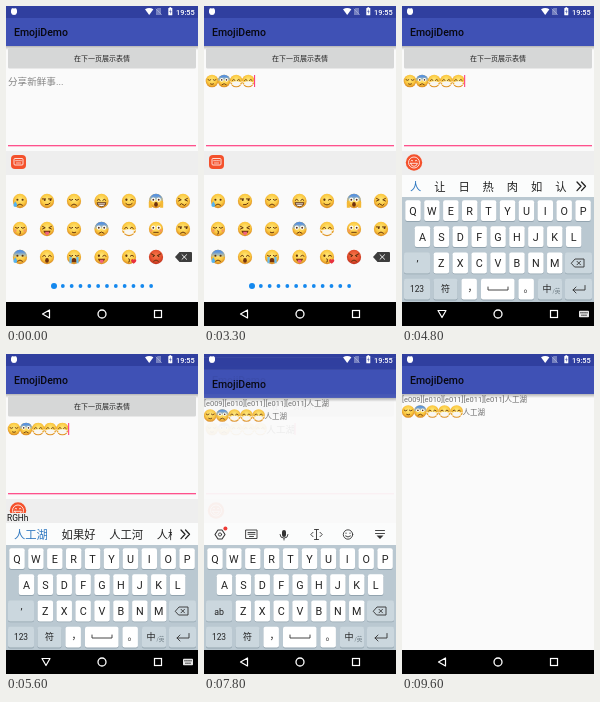
These frames come from a looping animation (192x320 px, 9.7 s). An HTML page:

```html
<!DOCTYPE html>
<html lang="zh-CN">
<head>
<meta charset="utf-8">
<title>Emoji input</title>
<style>
html, body { margin: 0; width: 100%; height: 100%; overflow: hidden; background: #fafafa; }
svg { display: block; width: 100%; height: 100%; }
text { font-family: Roboto, "Noto Sans CJK SC", "Noto Sans CJK", sans-serif; white-space: pre; }
.line { fill: none; stroke: #333; stroke-width: .9; stroke-linecap: round; stroke-linejoin: round; }
.ink { fill: none; stroke: #63340f; stroke-width: .95; stroke-linecap: round; stroke-linejoin: round; }
</style>
</head>
<body>
<svg id="stage" viewBox="0 0 192 320" preserveAspectRatio="none"></svg>
<script>
const LOOP = 9700, STEP = 100;
const rect = (x, y, w, h, fill, r = 0) => `<rect x="${x}" y="${y}" width="${w}" height="${h}" rx="${r}" fill="${fill}"/>`;
const disc = (x, y, r, fill) => `<circle cx="${x}" cy="${y}" r="${r}" fill="${fill}"/>`;
const fillPath = (d, fill) => `<path d="${d}" fill="${fill}"/>`;
const stroke = (d, cls = 'line', attrs = '') => `<path class="${cls}" d="${d}" ${attrs}/>`;
const label = (x, y, size, str, fill = '#222', attrs = '') =>
  `<text x="${x}" y="${y}" font-size="${size}" fill="${fill}" ${attrs}>${str}</text>`;
const centered = (x, y, size, str, fill) => label(x, y, size, str, fill, 'text-anchor="middle"');
const group = (id, body, attrs = '') => `<g id="${id}" ${attrs}>${body}</g>`;

// Facial parts, drawn around the origin on a face of radius 7
const eyes = {
  dots: disc(-2.5, -1.2, 1, '#5a2f10') + disc(2.5, -1.2, 1, '#5a2f10'),
  closed: stroke('M-4.4-1.4q1.7 1.7 3.2 0M1.2-1.4q1.5 1.7 3.2 0', 'ink'),
  happy: stroke('M-4.2-.7q1.5-2.2 3 0M1.2-.7q1.5-2.2 3 0', 'ink'),
  squint: stroke('M-4.3-2.5l2.6 1.3-2.6 1.2M4.3-2.5l-2.6 1.3 2.6 1.2', 'ink'),
  wide: [-2.6, 2.6].map(x => disc(x, -1.3, 2, '#fff') + disc(x, -1.2, .9, '#5a2f10')).join(''),
  side: stroke('M-4.5-2h3.2M1.3-2h3.2', 'ink') + disc(-2.2, -1, .9, '#5a2f10') + disc(3.4, -1, .9, '#5a2f10'),
  wink: disc(-2.5, -1.2, 1.1, '#5a2f10') + stroke('M1.2-.9q1.6-1.8 3.2 0', 'ink'),
  angry: stroke('M-4.5-3l3.3 1.6M4.5-3l-3.3 1.6', 'ink') + disc(-2.5, -.8, .8, '#5a2f10') + disc(2.5, -.8, .8, '#5a2f10')
};
const mouths = {
  frown: stroke('M-2.4 4q2.4-2.4 4.8 0', 'ink'),
  smile: stroke('M-3 2.5q3 2.8 6 0', 'ink'),
  calm: stroke('M-1.7 3.2q1.7 1.2 3.400 0', 'ink'),
  smirk: stroke('M-1.5 3.6q3 .5 4.5-1.5', 'ink'),
  flat: stroke('M-2.2 3.2h4.4', 'ink'),
  wave: stroke('M-3 3.5q1.5-2 3 0t3-.4', 'ink'),
  grin: '<path d="M-4.2 1.4h8.4q-.4 4-4.2 4t-4.2-4z" fill="#fff" stroke="#63340f" stroke-width=".8"/>' + stroke('M-3.8 3h7.6', 'ink', 'stroke-width=".5"'),
  open: '<ellipse cy="3.3" rx="1.8" ry="2.3" fill="#70320f"/>',
  wail: fillPath('M-2.6 5q0-4 2.6-4t2.6 4z', '#70320f'),
  kiss: stroke('M-.4 1.8q2 .5 .4 1.3 2 .6-.4 1.7', 'ink'),
  tongue: fillPath('M-3.5 1.8h7q-.7 3-3.5 3t-3.5-3z', '#70320f') + fillPath('M-1.7 2.7h3.6v2q-1.8 2.5-3.6 0z', '#f0647c'),
  mask: stroke('M-6.4 .8l2 1M6.4 .8l-2 1M-5.600 4.500l1.400-.6M5.600 4.500l-1.400-.6', 'ink', 'style="stroke:#fff;stroke-width:.8"') +
    fillPath('M-4.700 1.300Q0-.6 4.700 1.300L4.200 4Q0 7.400-4.200 4z', '#f8f6f2')
};
const extras = {
  blue: fillPath('M-6.9 0A6.9 6.9 0 0 1 6.9 0Q0-1.500-6.9 0z', 'url(#chill)'),
  drop: fillPath('M-4.5 .3q3.5 5-.1 5.6-3.5-.6 .1-5.6z', '#55b3ee'),
  tears: fillPath('M-4.4 0h2.1v6h-2.1zM2.3 0h2.1v6H2.3z', '#69bdf1'),
  blush: disc(-4.6, 1.6, 1.3, '#f69a5b') + disc(4.6, 1.6, 1.3, '#f69a5b'),
  heart: fillPath('M4.5 6.5Q.8 3.8 2.5 2.3 3.8 1.5 4.5 3q.9-1.5 2.2-.5Q8 4.3 4.5 6.5z', '#e8313f'),
  hands: fillPath('M-7 1q2-1.8 2.6 1l.5 4.5h-3zM7 1Q5 -.8 4.4 2l-.5 4.5h3z', '#f4b936')
};
const faces = [
  'dots frown drop', 'side smirk', 'closed frown', 'happy grin', 'wink smile', 'wide open blue hands', 'squint wave',
  'closed kiss blush', 'squint tongue', 'closed calm', 'wide frown blue', 'happy mask', 'wide flat blush', 'side frown',
  'dots frown blue drop', 'happy open', 'closed wail tears', 'wink tongue', 'wink kiss heart', 'angry frown red'
];
function faceSymbol(spec, i) {
  const [eye, mouth, ...more] = spec.split(' ');
  const skin = more.includes('red') ? 'redSkin' : 'skin';
  const under = more.includes('blue') ? extras.blue : '';
  const over = more.filter(m => m !== 'blue').map(m => extras[m] || '').join('');
  return group('face' + i, `<circle r="6.9" fill="url(#${skin})"/>` + under + eyes[eye] + mouths[mouth] + over);
}
const face = (i, x, y, size) => `<use href="#face${i}" transform="translate(${x} ${y}) scale(${size / 14})"/>`;

const gradient = (id, a, b, c) => `<radialGradient id="${id}" cy=".4" r=".62"><stop stop-color="${a}"/>
  <stop offset=".6" stop-color="${b}"/><stop offset="1" stop-color="${c}"/></radialGradient>`;
const defs = `<defs>${gradient('skin', '#ffe97c', '#fbc840', '#d5801c')}${gradient('redSkin', '#f77c4d', '#e6512f', '#b92d1b')}
  <linearGradient id="shade" x2="0" y2="1"><stop stop-opacity=".28"/><stop offset="1" stop-opacity="0"/></linearGradient>
  <linearGradient id="chill" x2="0" y2="1"><stop offset=".3" stop-color="#5b93dc"/><stop offset="1" stop-color="#9fc0d8" stop-opacity=".4"/></linearGradient>
  <clipPath id="aboveNav"><rect width="192" height="296"/></clipPath>
  <clipPath id="words"><rect y="169" width="166" height="23"/></clipPath>
  ${faces.map(faceSymbol).join('')}</defs>`;

const typed = [9, 10, 11, 11, 11];
const header = rect(0, 0, 192, 12, '#303f9f') + rect(0, 12, 192, 28, '#3f51b5') + rect(0, 40, 192, 4, 'url(#shade)') +
  label(8, 30.4, 10.5, 'EmojiDemo', '#080810', 'font-weight="500"');

const statusIcons = fillPath('M5 4.5q0-2.5 2-2.5l1 .8 1-.8q2 0 2 2.5v2Q10.5 9 8 9T5 6.5z', '#fff') +
  fillPath('M139 3.3q4.2-2.6 8.4 0L143.2 9z', '#fff') +
  fillPath('M151.5 2h3.500v7h-5V3.500z', '#7580c0') + stroke('M150 3l5.500 5.500', 'line', 'style="stroke:#b5bce0;stroke-width:.6"') +
  rect(162.3, 2, 4, 7.3, '#fff', .5) + rect(163.4, 1.2, 1.8, 1, '#fff') + fillPath('M164.600 3l-1.300 3h1v2.300l1.300-3h-1z', '#5562b0') +
  label(170, 8.5, 7.4, '19:55', '#fff', 'font-weight="500"');

const keyboardBadge = rect(5, 149, 15, 14, '#f4512c', 4) +
  '<rect x="8" y="152.5" width="9" height="6.5" rx="1" fill="none" stroke="#fff" stroke-width=".8"/>' +
  stroke('M9.6 154.7h5.8M10.5 157h4', 'line', 'style="stroke:#fff;stroke-width:.7;stroke-dasharray:1 .8"');
const smileBadge = disc(12, 156.5, 8.2, '#f4512c') +
  stroke('M9 154.8q.9-1.400 1.800 0M13.200 154.800q.9-1.400 1.800 0M8.600 157.300h6.800q-.6 3-3.400 3t-3.400-3z', 'line', 'style="stroke:#fff;stroke-width:.8"') +
  '<circle cx="12" cy="156.5" r="5.500" fill="none" stroke="#fff" stroke-width=".8"/>';

const columns = [14, 41, 68, 95.5, 123, 150, 177];
const emojiPanel = rect(0, 169, 192, 127, '#fafafa') +
  faces.map((_, i) => face(i, columns[i % 7], 195 + 28 * Math.floor(i / 7), 14.5)).join('') +
  fillPath('M169 251l4.5-5H185q1 0 1 1v8q0 1-1 1h-11.5z', '#3d3d3d') +
  stroke('M176 248.7l4.6 4.6m0-4.6l-4.6 4.6', 'line', 'style="stroke:#fff"') +
  Array.from({ length: 12 }, (_, i) => disc(48 + 8.83 * i, 280, i ? 1.9 : 3, '#1488ee')).join('');

const editor = rect(0, 0, 192, 296, '#fafafa') + header +
  rect(2, 43, 188, 19.5, 'rgba(0,0,0,.14)', 1.5) + rect(2, 42.3, 188, 19.5, '#d6d7d7', 1.5) +
  centered(96, 54.7, 7, '在下一页展示表情') +
  group('hint', label(2, 78.6, 9.6, '分享新鲜事...', '#858585')) +
  typed.map((f, i) => group('typed' + i, face(f, 8 + 12.1 * i, 75, 12.8))).join('') +
  group('committed', label(62.3, 78.6, 9.6, '人工湖')) +
  group('cursor', rect(0, 69, 1.1, 12, '#ff4081')) +
  rect(2, 139.1, 188, 1.2, '#ff4081') + rect(0, 145, 192, 24, '#eeeeee') +
  group('keyboardBadge', keyboardBadge) + group('smileBadge', smileBadge) + group('emojiPanel', emojiPanel);

const detail = rect(0, 0, 192, 320, '#fafafa') + header +
  label(0, 47.7, 7.47, '[e009][e010][e011][e011][e011]人工湖', '#6c6c6c') +
  typed.map((f, i) => face(f, 6.2 + 12.1 * i, 57.5, 12.8)).join('') + label(60.5, 61, 7.47, '人工湖', '#6c6c6c');

// Soft keyboard
const GREY = '#cbd7de', PITCH = 18.9;
const key = (x, y, w, fill = '#fff') => rect(x, y + .9, w, 20.8, '#93a4af', 2) + rect(x, y, w, 20.8, fill, 2);
const letters = (row, x, y) => [...row].map((c, i) =>
  key(x + PITCH * i - 7.7, y, 15.4) + centered(x + PITCH * i, y + 14.4, 10.8, c)).join('');
const more = stroke('M175 176l4 4.3-4 4.3m4.5-8.6l4 4.3-4 4.3', 'line', 'style="stroke:#222;stroke-width:1.3"');
const words = (list, x, step) => `<g clip-path="url(#words)">` +
  list.split(' ').map((w, i) => label(x + step * i, 184.9, 11.3, w, i ? '#222' : '#2f78c0')).join('') + '</g>' + more;
const tools = stroke('M14 176h4l1.200 1.800 1.800 2.700-1.800 2.700L18 185h-4l-1.200-1.800-1.800-2.700 1.800-2.700z', 'line', 'style="stroke-width:1.1"') +
  '<circle class="line" cx="16" cy="180.5" r="1.600"/>' + disc(21.4, 174.5, 2, '#ee3b35') +
  stroke('M42 176h11v8.500H42zM44 178.500h7M44 180.300h7', 'line', 'stroke-dasharray="none"') + stroke('M45.500 182.500h4') +
  fillPath('M78 178a2 2 0 0 1 4 0v3a2 2 0 0 1-4 0z', '#333') + stroke('M76 180.500q0 3.600 4 3.600t4-3.600M80 184.300v1.700') +
  stroke('M112.5 175.5v10M110.5 175.5h4M110.5 185.5h4M109 178.300l-2.2 2.200 2.2 2.200M116 178.300l2.2 2.200-2.2 2.200') +
  '<circle class="line" cx="144" cy="180.5" r="4.700"/>' + stroke('M142 179v.5M146 179v.5M141.5 182q2.5 2.2 5 0') +
  stroke('M171.500 176.500h9M171.500 179.500h9') + fillPath('M172.500 181.500h7l-3.500 3.500z', '#333');
const keyboard = rect(0, 169, 192, 22, '#fbfcfc') + rect(0, 191, 192, 105, '#bac8d1') +
  letters('QWERTYUIOP', 11, 194.2) + letters('ASDFGHJKL', 11 + PITCH / 2, 220.3) + letters('ZXCVBNM', 11 + PITCH * 1.5, 246.6) +
  key(2, 246.6, 26, GREY) + key(163, 246.6, 27, GREY) +
  stroke('M169.5 257l3.5-4h9v8h-9zM175 255.3l3.5 3.5m0-3.5l-3.5 3.5') +
  key(2, 272.8, 26, GREY) + centered(15, 286.3, 8.4, '123') + key(31.5, 272.8, 24, GREY) + centered(43.5, 286.3, 9, '符') +
  key(59.5, 272.8, 15.4) + label(65.5, 284.5, 10, '，') + key(79, 272.8, 33.5) + stroke('M86 281v3h20v-3') +
  key(116.5, 272.8, 15.4) + label(121.5, 285.5, 10, '。') +
  key(136, 272.8, 24, GREY) + centered(145, 286, 9, '中') + label(150.5, 286.5, 5.5, '/英', '#65747c') +
  key(163, 272.8, 27, GREY) + stroke('M183 279.5v4.5h-12m3-3l-3 3 3 3') +
  group('modeKey', centered(15, 260.6, 8.8, 'ab')) + group('splitKey', centered(15.5, 262.3, 10, '’')) +
  group('tools', tools) + group('words1', words('人 让 日 热 肉 如 认', 8, 24.2)) +
  group('words2', words('如果 人工 热狗 日光 入股', 8, 36)) + group('words3', words('人工湖 如果好 人工河 人格化', 8, 47.6));

const nav = rect(0, 296, 192, 24, '#000') +
  group('back', '<path d="M43.5 304v8l-7-4z" fill="none" stroke="#fff" stroke-width="1.2" stroke-linejoin="round"/>') +
  '<circle cx="96" cy="308" r="4" fill="none" stroke="#fff" stroke-width="1.3"/>' +
  '<rect x="148.5" y="304.5" width="7" height="7" fill="none" stroke="#fff" stroke-width="1.2"/>' +
  group('imeSwitch', rect(177, 304.7, 10, 6.6, '#e6e6e6', .8) +
    stroke('M178.5 306.8h7M179.5 309.2h5', 'line', 'style="stroke:#000;stroke-width:.7;stroke-dasharray:.8 .8"'));

document.getElementById('stage').innerHTML = defs + `<g clip-path="url(#aboveNav)">` + group('editor', editor) +
  group('composing', rect(0, 159, 24, 10, '#eeeeee') + '<text id="spelling" x="1" y="166.5" font-size="8.4" fill="#111"></text>') +
  group('detail', detail) + group('keyboard', keyboard) + '</g>' + statusIcons + nav;

const $ = id => document.getElementById(id);
const show = (id, on) => { $(id).style.display = on ? '' : 'none'; };
const within = (t, ...spans) => spans.some(([a, b]) => t >= a && t < b);
const slide = (id, y, alpha) => { $(id).setAttribute('transform', `translate(0 ${y})`); $(id).setAttribute('opacity', alpha); };

const insertTimes = [2300, 2700, 3000, 3300, 3500];
const spellings = [[4900, 'R'], [5100, 'RG'], [5400, 'RGH'], [5600, 'RGHh']];

function draw(t) {
  const count = insertTimes.filter(at => t >= at).length;
  const committed = t >= 6400;
  const imeActive = within(t, [4100, 7800]);
  const composing = within(t, [4800, 6400]);
  insertTimes.forEach((at, i) => show('typed' + i, t >= at));
  show('hint', !count);
  show('committed', committed);
  show('cursor', within(t, [300, 800], [1300, 1800], [2300, 4000], [4500, 5000], [5500, 6000], [6400, 6900], [7400, 7900]));
  $('cursor').setAttribute('transform', `translate(${committed ? 90.5 : 1.6 + 12.1 * count} 0)`);

  show('keyboardBadge', t < 4000);
  show('smileBadge', t >= 4000);
  show('emojiPanel', t < 4100);
  show('keyboard', within(t, [4100, 8000]));
  show('imeSwitch', imeActive);
  $('back').setAttribute('transform', imeActive ? 'rotate(-90 40 308)' : '');
  const enter = Math.min(1, (t - 4000) / 300), leave = Math.max(0, (t - 7800) / 200);
  slide('keyboard', 28 * (1 - enter) ** 2 + 60 * leave, Math.max(0, Math.min(1, enter * 1.3) - leave));

  show('modeKey', !composing);
  show('splitKey', composing);
  show('tools', !composing);
  show('words1', within(t, [4800, 5100]));
  show('words2', within(t, [5100, 5400]));
  show('words3', within(t, [5400, 6400]));
  show('composing', within(t, [4900, 6400]));
  $('spelling').textContent = spellings.filter(([at]) => t >= at).map(s => s[1]).pop() || '';

  const open = Math.max(0, Math.min(1, (t - 7600) / 400));
  show('detail', open > 0);
  slide('detail', 25.6 * (1 - open) ** 2.7, Math.min(1, open * 1.88));
}

const start = performance.now();
function tick() {
  const t = (performance.now() - start) % LOOP;
  draw(Math.floor(t / STEP) * STEP);
  requestAnimationFrame(tick);
}
tick();
</script>
</body>
</html>
```
